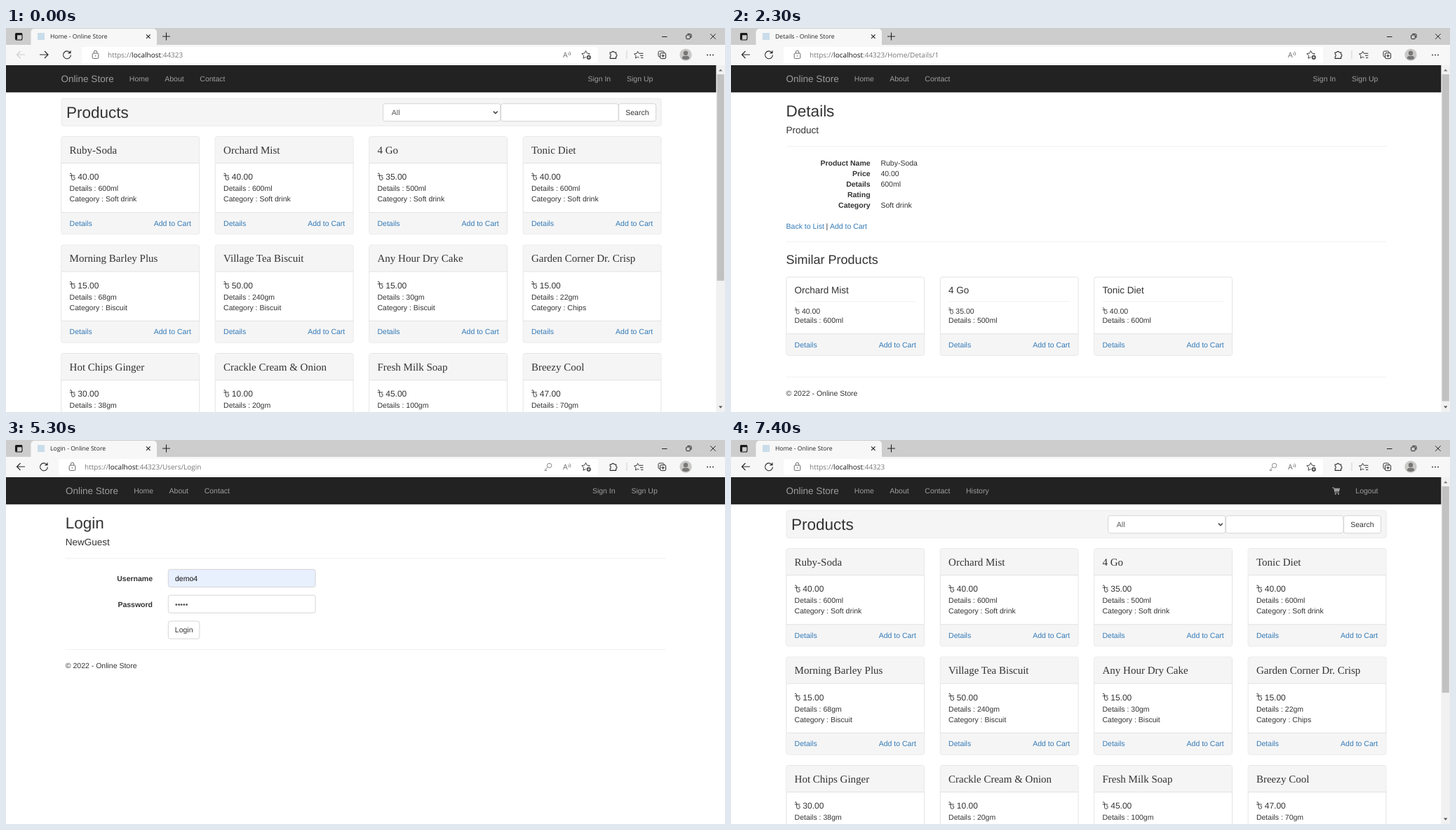
An HTML page with a canvas for the animation above (8 s loop, 1025 by 547 pixels).

```html
<!DOCTYPE html>
<html lang="en">
<head>
<meta charset="utf-8">
<title>Online Store</title>
<style>
  html, body { margin: 0; width: 100%; height: 100%; overflow: hidden; background: #fff; }
  canvas { display: block; }
</style>
</head>
<body>
<canvas id="stage" width="1025" height="547"></canvas>
<script>
const ctx = document.getElementById('stage').getContext('2d');
const SANS = '"Liberation Sans", Arial, sans-serif';
const SERIF = '"Liberation Serif", "Times New Roman", serif';
const UI = '"Open Sans", "Noto Sans", sans-serif';
const INK = '#333', LINK = '#337ab7', ICON = '#2b2b2b', SOFT = '#666';
const LEFT = 78.6, COLUMN = 219.45;

// name, price, size, category
const products = [
  ['Ruby-Soda', 40, '600ml', 'Soft drink'],
  ['Orchard Mist', 40, '600ml', 'Soft drink'],
  ['4 Go', 35, '500ml', 'Soft drink'],
  ['Tonic Diet', 40, '600ml', 'Soft drink'],
  ['Morning Barley Plus', 15, '68gm', 'Biscuit'],
  ['Village Tea Biscuit', 50, '240gm', 'Biscuit'],
  ['Any Hour Dry Cake', 15, '30gm', 'Biscuit'],
  ['Garden Corner Dr. Crisp', 15, '22gm', 'Chips'],
  ['Hot Chips Ginger', 30, '38gm', 'Chips'],
  ['Crackle Cream & Onion', 10, '20gm', 'Chips'],
  ['Fresh Milk Soap', 45, '100gm', 'Soap'],
  ['Breezy Cool', 47, '70gm', 'Soap'],
];

function text(str, x, y, { size = 10.5, color = INK, font = SANS, weight = 400, align = 'left' } = {}) {
  ctx.font = `${weight} ${size}px ${font}`;
  ctx.textAlign = align;
  ctx.fillStyle = color;
  ctx.fillText(str, x, y);
}

function rect(x, y, w, h, color) {
  ctx.fillStyle = color;
  ctx.fillRect(x, y, w, h);
}

function box(x, y, w, h, fill, border, radius = 3, line = 0.8) {
  ctx.beginPath();
  ctx.roundRect(x, y, w, h, radius);
  if (fill) { ctx.fillStyle = fill; ctx.fill(); }
  if (border) { ctx.strokeStyle = border; ctx.lineWidth = line; ctx.stroke(); }
}

function stroke(d, color = ICON, width = 1) {
  ctx.strokeStyle = color;
  ctx.lineWidth = width;
  ctx.stroke(new Path2D(d));
}

function fill(d, color = ICON) {
  ctx.fillStyle = color;
  ctx.fill(new Path2D(d));
}

function dot(x, y, r, color) {
  ctx.fillStyle = color;
  ctx.beginPath();
  ctx.arc(x, y, r, 0, 7);
  ctx.fill();
}

function at(x, y, scale, draw) {
  ctx.save();
  ctx.translate(x, y);
  ctx.scale(scale, scale);
  draw();
  ctx.restore();
}

const rule = (x, y, w, color = '#eee') => rect(x, y, w, 0.8, color);

function star(x, y, r) {
  let d = '';
  for (let i = 0; i < 10; i++) {
    const a = i * Math.PI / 5 - Math.PI / 2, k = i % 2 ? r * 0.5 : r;
    d += `${i ? 'L' : 'M'}${x + k * Math.cos(a)} ${y + k * Math.sin(a)}`;
  }
  stroke(d + 'Z', ICON, 0.9);
}

function price(value, x, y, size) {
  at(x, y, size / 12, () =>
    stroke('M.4-9Q2.8-10 3-7.6V-2.4Q3 .6 5.4.4Q7.8.2 7.7-2.4Q7.4-4.6 5.6-3.8M.2-6H7.8', INK, 0.95));
  text(value.toFixed(2), x + size * 0.98, y, { size });
}

function titleBar(title) {
  rect(0, 0, 1025, 24, '#cdcdcd');
  box(35.5, 1, 179.5, 30, '#f7f7f7', null, 5);
  box(13.5, 7.5, 9.5, 9.5, null, '#1a1a1a', 2, 1.1);
  rect(13.5, 7.2, 9.5, 3, '#1a1a1a');
  rect(13.5, 8, 2.6, 8, '#1a1a1a');
  rect(45, 7, 10, 10, '#c9dcea');
  text(title + ' - Online Store', 63, 15.2, { size: 8.65, font: UI, color: '#222' });
  stroke('M200 9.3L205.6 14.9M205.6 9.3L200 14.9', '#222', 1.1);
  stroke('M223 12H234M228.5 6.5V17.5', '#222', 1.1);
  stroke('M935 12.5H942.5', '#222', 1);
  stroke('M1004.2 8.4L1011.6 15.8M1011.6 8.4L1004.2 15.8', '#222', 1);
  box(969.7, 10, 5.6, 5.6, null, '#222', 1, 1);
  stroke('M971.5 8.4H975.5Q977 8.4 977 10V14', '#222', 1);
}

function toolbar({ path, forward, key }) {
  const shift = forward ? 33 : 0;
  rect(0, 24, 1025, 29, '#f7f7f7');
  box(75 + shift, 27, 769 - shift, 23, '#fff', null, 3);

  stroke('M27 38H15.5M20.5 33L15.5 38L20.5 43', forward ? '#ccc' : ICON, 1.15);
  if (forward) stroke('M48 38H60M55 33L60 38L55 43', ICON, 1.15);
  at(54 + shift, 38.2, 1, () =>
    stroke('M4.4-3A5.4 5.4 0 1 0 5.4.2M5-6V-2.6H1.4', ICON, 1.15));
  at(94.5 + shift, 38, 1, () => {
    box(-4.3, -2, 8.6, 7.4, null, SOFT, 1.3, 1);
    stroke('M-2.2-2V-3.6A2.2 2.2 0 0 1 2.2-3.6V-2', SOFT, 1);
    dot(0, 1.7, 0.8, SOFT);
  });

  let x = 112 + shift;
  for (const [part, color] of [['https://', '#777'], ['localhost', '#161616'], [':44323' + path, '#777']]) {
    text(part, x, 41.7, { size: 10, font: UI, color });
    x += ctx.measureText(part).width;
  }

  if (key) {
    ctx.strokeStyle = '#888';
    ctx.lineWidth = 1;
    ctx.beginPath();
    ctx.arc(774.6, 36.4, 3.2, 0, 7);
    ctx.stroke();
    stroke('M772.2 38.7L768 42.8V43.6H770.6V42', '#888', 1);
  }
  text('A', 794, 42, { size: 10.5, font: UI, color: SOFT });
  stroke('M801.5 35.2Q803 36.6 801.8 38.6M803.2 33.4Q806 36 804 39.2', SOFT, 0.8);

  star(826.5, 38.4, 6);
  dot(830.8, 41.8, 3.9, '#fff');
  dot(830.8, 41.8, 3.1, '#444');
  stroke('M829 41.8H832.6M830.8 40V43.6', '#fff', 0.8);

  stroke('M861.2 34.8H863.4A2 2 0 0 1 867.2 34.8H869.6V37.2A2 2 0 0 1 869.6 41V43.4H861.2V40.8A2 2 0 0 0 861.2 37.2Z', ICON, 1.1);
  rect(884.5, 32, 0.9, 12, '#ccc');
  star(900.6, 38.6, 5.4);
  rect(902.5, 36, 6.5, 8, '#f7f7f7');
  stroke('M902.6 36.2H908.4M904 39.3H908.4M905 42.4H908.4', ICON, 1);

  box(930, 33, 8, 8, null, ICON, 1.6, 1);
  box(932.6, 35.6, 8, 8, '#f7f7f7', ICON, 1.6, 1);
  stroke('M934.4 39.6H938.8M936.6 37.4V41.8', ICON, 1);

  dot(969, 38.2, 8.6, '#cbc9c7');
  dot(969, 35.8, 3.2, '#777');
  fill('M963.7 43.6Q964 39.8 967 39.8H971Q974 39.8 974.3 43.6Q969 46.8 963.7 43.6Z', '#777');
  for (const dx of [0, 4, 8]) dot(1000 + dx, 38.4, 0.95, ICON);
}

function navbar(shift, signedIn) {
  rect(0, 53, 1025, 38.2, '#222');
  rect(0, 90.6, 1025, 0.9, '#080808');
  const item = (str, x, y = 76, size = 10.5) => text(str, x + shift, y, { size, color: '#9d9d9d' });
  item('Online Store', 78.6, 76.7, 13.5);
  item('Home', 175.8);
  item('About', 226.2);
  item('Contact', 276.3);
  if (signedIn) {
    item('History', 335);
    item('Logout', 890.3);
    fill('M857 67.4H859.6L860.2 68.8H868.2L867 73.4H861.3L861.6 74.6H867V75.6H860.8L859 68.6H857Z', '#9d9d9d');
    dot(861.8, 77, 1.1, '#9d9d9d');
    dot(866, 77, 1.1, '#9d9d9d');
  } else {
    item('Sign In', 829.5);
    item('Sign Up', 885);
  }
}

function scrollbar(bottom) {
  rect(1012.3, 53, 12.7, 494, '#f1f1f1');
  rect(1013.6, 66, 10.2, bottom - 66, '#c1c1c1');
  fill('M1016 61.5L1018.7 58.4L1021.4 61.5Z', '#777');
  fill('M1016 538.6L1018.7 541.7L1021.4 538.6Z', '#555');
}

function cardFooter(x, y) {
  text('Details', x + 11.8, y, { color: LINK });
  text('Add to Cart', x + 185, y, { color: LINK, align: 'right' });
}

function shopCard([name, cost, size, category], x, y) {
  box(x, y, 196.8, 139, '#fff', '#ddd');
  box(x + 0.4, y + 0.4, 196, 37.4, '#f5f5f5', null, [3, 3, 0, 0]);
  box(x + 0.4, y + 108, 196, 30.6, '#f5f5f5', null, [0, 0, 3, 3]);
  rule(x, y + 37.5, 196.8, '#ddd');
  rule(x, y + 107.7, 196.8, '#ddd');
  text(name, x + 11.8, y + 24.2, { size: 15, font: SERIF });
  price(cost, x + 11.8, y + 61.5, 12);
  text('Details : ' + size, x + 11.8, y + 77.6);
  text('Category : ' + category, x + 11.8, y + 92.7);
  cardFooter(x, y + 127.2);
}

function similarCard([name, cost, size], x, y) {
  box(x, y, 196.8, 111.6, '#fff', '#ddd');
  box(x + 0.4, y + 81, 196, 30.2, '#f5f5f5', null, [0, 0, 3, 3]);
  rule(x, y + 80.5, 196.8, '#ddd');
  text(name, x + 11.8, y + 23.1, { size: 13.5 });
  rule(x + 11.8, y + 34.5, 173.2);
  price(cost, x + 11.8, y + 52, 10.5);
  text('Details : ' + size, x + 11.8, y + 65.4);
  cardFooter(x, y + 100);
}

function heading(title, subtitle, x) {
  text(title, x, 126.4, { size: 22.5 });
  text(subtitle, x, 149.5, { size: 13.5 });
  rule(x, 168, 856);
}

function footer(x, y) {
  rule(x, y, 856);
  text('© 2022 - Online Store', x, y + 27.1);
}

function homePage() {
  box(LEFT + 0.4, 100.4, 855.2, 39, '#f5f5f5', '#e6e6e6');
  text('Products', 86, 127.6, { size: 22.5 });
  box(537.6, 107.8, 167.2, 25, '#fff', '#ccc');
  box(705.6, 107.8, 167.4, 25, '#fff', '#ccc');
  box(873.6, 107.8, 53, 25, '#fff', '#ccc');
  text('All', 549.8, 124, { color: '#555' });
  stroke('M694.8 118.8L697.8 121.8L700.8 118.8', INK, 1.3);
  text('Search', 883.2, 124);
  products.forEach((p, i) => shopCard(p, LEFT + 0.2 + COLUMN * (i % 4), 154.7 + 154.4 * Math.floor(i / 4)));
}

function detailsPage() {
  heading('Details', 'Product', LEFT);
  const [name, cost, size, category] = products[0];
  const facts = [['Product Name', name], ['Price', cost.toFixed(2)], ['Details', size], ['Rating', ''], ['Category', category]];
  facts.forEach(([label, value], i) => {
    const y = 195.5 + 15.05 * i;
    text(label, 198.6, y, { weight: 700, align: 'right' });
    text(value, 213.4, y);
  });
  text('Back to List', LEFT, 285.6, { color: LINK });
  text('|', 135.6, 285.6);
  text('Add to Cart', 140.9, 285.6, { color: LINK });
  rule(LEFT, 304, 856);
  text('Similar Products', LEFT, 335.8, { size: 18 });
  products.slice(1, 4).forEach((p, i) => similarCard(p, LEFT + 0.2 + COLUMN * i, 354.8));
  footer(LEFT, 496.7);
}

function loginPage() {
  const x = 84.8;
  heading('Login', 'NewGuest', x);
  [['Username', 'demo4', '#e8f0fe', '#111'], ['Password', '•••••', '#fff', '#555']].forEach(([label, value, back, color], i) => {
    const y = 184.3 + 36.8 * i;
    text(label, 209, y + 16.5, { weight: 700, align: 'right' });
    box(231.3, y, 209.8, 25.2, back, '#ccc');
    text(value, 241, y + 16.5, { color });
  });
  box(231.3, 258, 44.6, 25.2, '#fff', '#ccc');
  text('Login', 240.8, 274.3);
  footer(x, 298.3);
}

const scenes = [
  { until: 500, title: 'Home', path: '', forward: true, page: homePage, thumb: 360 },
  { until: 3500, title: 'Details', path: '/Home/Details/1', page: detailsPage, thumb: 531.5 },
  { until: 6500, title: 'Login', path: '/Users/Login', key: true, page: loginPage, shift: 6.4 },
  { until: 8000, title: 'Home', path: '', key: true, page: homePage, thumb: 360, signedIn: true },
];

const start = performance.now();
function render(now) {
  const time = Math.max(0, now - start) % 8000;
  const scene = scenes.find(s => time < s.until);
  ctx.textRendering = 'geometricPrecision';
  rect(0, 0, 1025, 547, '#fff');
  scene.page();
  titleBar(scene.title);
  toolbar(scene);
  navbar(scene.shift || 0, scene.signedIn);
  if (scene.thumb) scrollbar(scene.thumb);
  requestAnimationFrame(render);
}
render(start);
</script>
</body>
</html>
```
